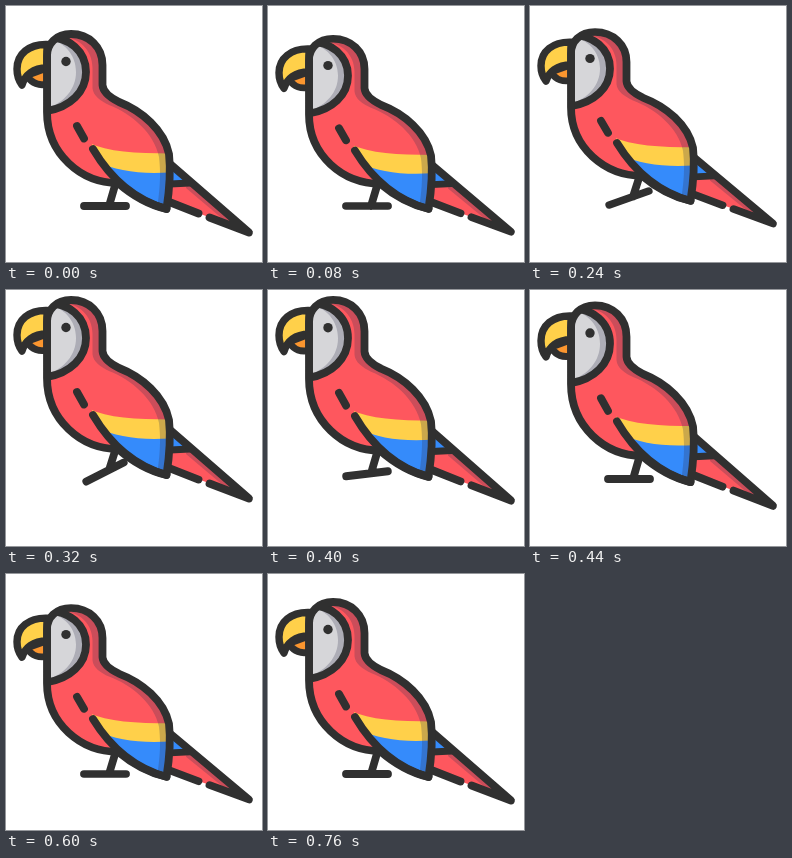
Recreate the animation shown at these times as an HTML page with a canvas. Size 256 px wide and 256 px high, loop 3560 ms.

```html
<!DOCTYPE html>
<html lang="en">
<head>
<meta charset="utf-8">
<title>Hopping parrot</title>
<style>
html, body { margin: 0; width: 100%; height: 100%; overflow: hidden; background: #fff; }
canvas { display: block; width: 100vw; height: 100vh; }
</style>
</head>
<body>
<canvas id="stage"></canvas>
<script>
const LOOP = 3560, STEP = 40, REST = 760;
const INK = '#303030', RED = '#fe575e', YELLOW = '#ffd04a', ORANGE = '#fb962f',
      BLUE = '#358bfb', GREY = '#d6d6d9', SHADE = 'rgba(50,50,75,.25)';
const canvas = document.getElementById('stage');
const ctx = canvas.getContext('2d');

// [time, value] pairs, eased between neighbours
const squash = [[0, 1], [160, .945], [240, .965], [360, 1.012], [440, 1.01], [540, .955], [600, .965], [760, 1]];
const tilt = [[200, 0], [240, -20], [320, -27], [440, 0]];

function at(keys, t) {
  if (t <= keys[0][0]) return keys[0][1];
  for (let i = 1; i < keys.length; i++) {
    const [a, u] = keys[i - 1], [b, v] = keys[i];
    if (t <= b) return u + (v - u) * (1 - Math.cos(Math.PI * (t - a) / (b - a))) / 2;
  }
  return keys[keys.length - 1][1];
}

// Ballistic height of the hop
function lift(t) {
  const x = (t - 348) / 40;
  return Math.min(0, 1.467 * x * x - 18.7);
}

function fill(d, color) {
  ctx.fillStyle = color;
  ctx.fill(new Path2D(d));
}

function line(d, width = 7.8) {
  ctx.lineWidth = width;
  ctx.strokeStyle = INK;
  ctx.stroke(new Path2D(d));
}

function clipped(d, paint) {
  ctx.save();
  ctx.clip(new Path2D(d));
  paint();
  ctx.restore();
}

// Darkens the part of a shape left uncovered by its own shifted copy
function shade(d, dx, dy) {
  clipped(d, () => {
    const p = new Path2D();
    p.rect(0, -50, 300, 400);
    p.addPath(new Path2D(d), new DOMMatrix([1, 0, 0, 1, dx, dy]));
    ctx.fillStyle = SHADE;
    ctx.fill(p, 'evenodd');
  });
}

function drawTail() {
  const tail = 'M158 153L243 226.5L158 194Z';
  fill(tail, RED);
  clipped(tail, () => {
    fill('M160 150L190 178L160 178Z', BLUE);
    fill('M182 174L243 226.5L225 220L180 182Z', SHADE);
  });
  line('M164 178L184 177', 7);
  line('M162 195.5L192.5 207.5M203.5 211.5L243 226.5L163 157');
}

function drawLeg(angle) {
  const r = angle * Math.PI / 180, x = 21 * Math.cos(r), y = 21 * Math.sin(r);
  line(`M110 176L103 ${200 + y * .2}M${99 - x} ${200 - y}L${99 + x} ${200 + y}`);
}

function drawFace() {
  const face = 'M41 31C63 31 80 45 80 66C80 86 64 101 41 105Z';
  fill(face, GREY);
  shade(face, -10, 0);
  line(face);
  ctx.fillStyle = INK;
  ctx.beginPath();
  ctx.arc(60, 55.5, 4.7, 0, 7);
  ctx.fill();
}

function drawBody() {
  const body = `M41 106L41 50C41 38 50 28 65 28C83 28 96.5 41 96.5 59L96.5 79
    C97 87 105 92 113 96C136 105 158 124 163 148C165 166 164 180 160.5 203
    Q135 197 112 177C75 177 41 148 41 106Z`;
  const edge = 'M87 143C100 165 122 192 160.5 203';
  const wing = `${edge}L175 203L175 120L82 120Z`;
  fill(body, RED);
  clipped(wing, () => clipped(body, () => {
    fill('M78 134.5C100 146.5 130 147.5 170 147.5L170 210L78 210Z', YELLOW);
    fill('M90 155C112 166 137 168.5 170 166L170 210L90 210Z', BLUE);
  }));
  shade(body, -10, 3);
  clipped(body, drawFace);
  line(body);
  line(edge);
  line('M71 120L78 132.5');
}

function drawBeak() {
  const lower = 'M22 69L41 62L41 78C33 80 26 77 22 71Z';
  const upper = 'M41 38.5C23 38 11 48 11 63C11 70 13 75 16 79C19 69 27 62 41 62Z';
  fill(lower, ORANGE);
  line(lower, 7);
  fill(upper, YELLOW);
  line(upper, 7.4);
}

function draw(t) {
  const k = window.devicePixelRatio || 1;
  const w = Math.round(innerWidth * k), h = Math.round(innerHeight * k);
  if (canvas.width !== w || canvas.height !== h) {
    canvas.width = w;
    canvas.height = h;
  }
  ctx.setTransform(w / 256, 0, 0, h / 256, 0, 0);
  ctx.fillStyle = '#fff';
  ctx.fillRect(0, 0, 256, 256);
  ctx.lineCap = ctx.lineJoin = 'round';

  const s = at(squash, t);
  ctx.translate(0, 200 * (1 - s) + lift(t));
  ctx.scale(1, s);
  drawLeg(at(tilt, t));
  drawTail();
  drawBeak();
  drawBody();
}

const start = performance.now();
function tick() {
  const t = (performance.now() - start) % LOOP;
  draw(Math.min(REST, Math.floor(t / STEP) * STEP));
  requestAnimationFrame(tick);
}
tick();
</script>
</body>
</html>
```
